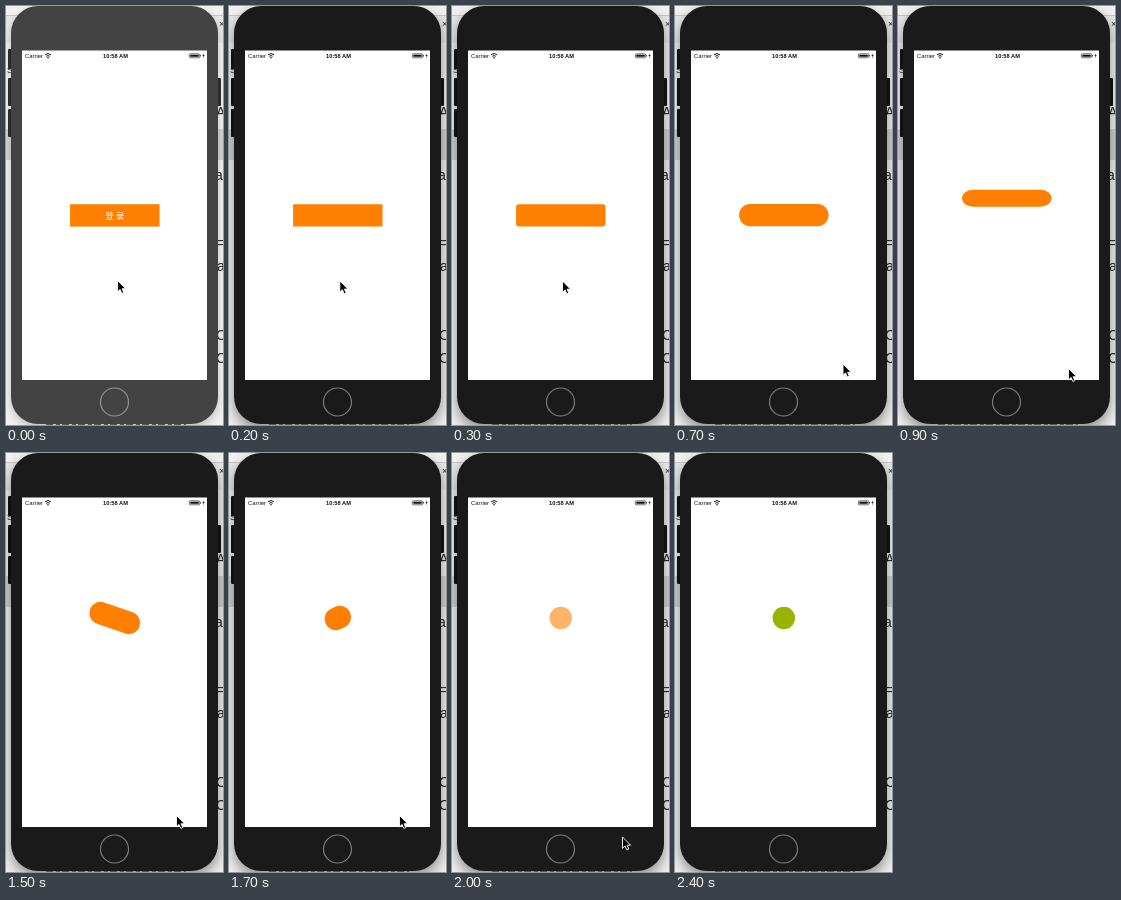
These frames come from a looping animation (217x419 px, 2500 ms). An HTML page:

```html
<!DOCTYPE html>
<html lang="zh">
<head>
<meta charset="utf-8">
<title>Login button animation</title>
<style>
  html, body { margin: 0; width: 100%; height: 100%; overflow: hidden; background: #e9e9e9; }
  svg { display: block; width: 217px; height: 419px; }
  text { font-family: "Liberation Sans", Arial, sans-serif; }
  .body { fill: #434343; filter: drop-shadow(0 4px 4px rgba(0, 0, 0, .2)); }
  .ring { fill: none; stroke: #929292; stroke-width: 1.2; }
  .active .body { fill: #1a1a1a; filter: drop-shadow(0 6px 7px rgba(0, 0, 0, .42)); }
  .active .ring { stroke: #7c7c7c; }
  .keys { fill: #303030; }
  .active .keys { fill: #151515; }
  .code { font-size: 14px; fill: #222; }
  .status { font-size: 5.9px; fill: #111; }
  .label { font: 8.5px "Noto Sans CJK SC", "Noto Sans CJK", sans-serif; fill: #fff; }
</style>
</head>
<body>
<svg id="stage" viewBox="0 0 217 419">
  <rect width="217" height="419" fill="#f1f1f1"/>
  <path d="M0 9.500H217" stroke="#c8c8c8"/>
  <rect y="10" width="217" height="27" fill="#e6e6e6"/>
  <rect y="123" width="217" height="31" fill="#d3d3d3"/>
  <g class="code">
    <text x="213" y="21" font-size="9">×</text>
    <text x="1" y="67" font-size="9">S</text>
    <text x="210" y="111">A</text>
    <text x="209" y="174">ar</text>
    <text x="210" y="242">=</text>
    <text x="211" y="265">a</text>
    <text x="210" y="334">C</text>
    <text x="210" y="357">C</text>
  </g>
  <g class="keys">
    <rect x="2" y="43" width="5" height="20" rx="1"/>
    <rect x="2" y="72" width="5" height="28" rx="1"/>
    <rect x="2" y="103" width="5" height="28" rx="1"/>
    <rect x="210" y="72" width="5" height="28" rx="1"/>
  </g>
  <rect class="body" x="5" y="0" width="207" height="418" rx="27"/>
  <path d="M40 418.500H180" stroke="#555" stroke-dasharray="7 3 4 2"/>
  <rect x="16" y="44.500" width="185" height="329.500" fill="#fff"/>
  <circle class="ring" cx="108.500" cy="396" r="14"/>
  <g class="status">
    <text x="19" y="52">Carrier</text>
    <text x="109.500" y="52" text-anchor="middle" font-weight="bold" font-size="5.700">10:58 AM</text>
    <g fill="none" stroke="#111" stroke-width="1">
      <path d="M39 48.800Q42 46.200 45 48.800M40.300 50.300Q42 48.800 43.700 50.300"/>
      <rect x="183.300" y="47.800" width="10.400" height="4" rx="1" stroke-width=".6"/>
    </g>
    <circle cx="42" cy="51.700" r=".8"/>
    <path d="M184.300 48.800h8.400v2h-8.400zM194.300 49h.7v1.600h-.7zM198 47l-1.600 3h1.200l-.6 2.400 1.700-3.200h-1.200z"/>
  </g>
  <g id="button">
    <rect id="pill"/>
    <text id="label" class="label" y="3.100" text-anchor="middle">登 录</text>
  </g>
  <path id="cursor" d="M0 0V11.300L2.600 8.900 4.300 12.900 6.300 12.100 4.600 8.200H8.100Z" fill="#000" stroke="#fff" stroke-width=".9"/>
</svg>
<script>
  const LOOP = 2500, STEP = 100;
  const FULL = 89.5, SIZE = 22.4;
  const ORANGE = [255, 128, 0], GREEN = [0, 255, 0];
  // time, x, y of the pointer tip
  const PATH = [
    [0, 111.5, 274.5], [300, 110.5, 275], [400, 112, 278], [700, 168, 358],
    [800, 170.5, 362.5], [1800, 170.5, 362.5], [2000, 170.5, 384], [2300, 171, 422]
  ];
  const $ = id => document.getElementById(id);
  const stage = $("stage"), button = $("button"), pill = $("pill"),
        label = $("label"), cursor = $("cursor");

  const mix = (a, b, p) => a + (b - a) * p;
  const span = (t, from, to) => Math.min(1, Math.max(0, (t - from) / (to - from)));

  function set(el, attrs) {
    for (const name in attrs) el.setAttribute(name, attrs[name]);
  }

  function pointer(t) {
    const i = PATH.findIndex(k => k[0] > t);
    if (i < 0) return PATH[PATH.length - 1].slice(1);
    const a = PATH[i - 1], b = PATH[i], p = span(t, a[0], b[0]);
    return [mix(a[1], b[1], p), mix(a[2], b[2], p)];
  }

  function draw(t) {
    const round = span(t, 170, 696);
    const rise = span(t, 696, 1224);
    const spin = span(t, 1208, 1736);
    const fade = span(t, 1736, 2195);
    const tint = span(t, 2195, 2707);

    const width = mix(FULL, SIZE, spin);
    const flip = Math.cos(rise * 2 * Math.PI);
    const rgb = ORANGE.map((c, i) => Math.round(mix(c, GREEN[i], tint)));

    stage.classList.toggle("active", t >= 100);
    label.style.display = t < 200 ? "" : "none";
    set(pill, {
      x: -width / 2, y: -SIZE / 2, width, height: SIZE,
      rx: round * SIZE / 2, fill: `rgb(${rgb})`,
      opacity: fade < 1 ? mix(1, .3, fade) : 1
    });
    set(button, {
      transform: `translate(108.8 ${mix(209.4, 165, rise)}) rotate(${spin * 360}) scale(1 ${flip})`
    });
    set(cursor, { transform: `translate(${pointer(t)})` });
  }

  const start = performance.now();
  function tick() {
    const t = (performance.now() - start) % LOOP;
    draw(Math.floor(t / STEP) * STEP);
    requestAnimationFrame(tick);
  }
  tick();
</script>
</body>
</html>
```
